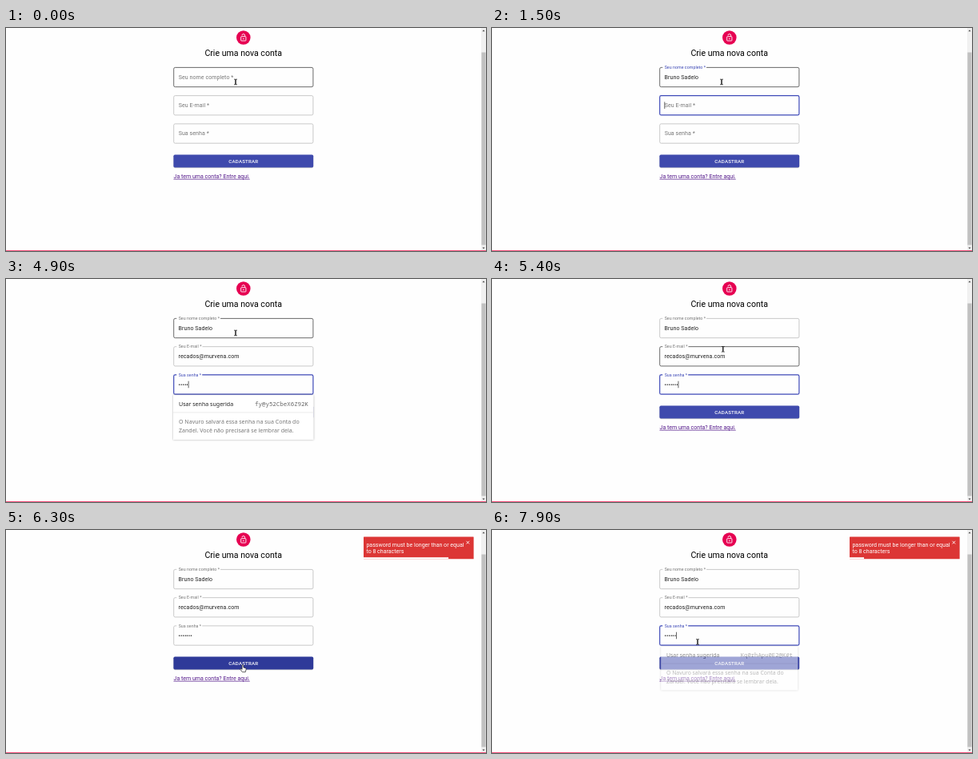
Animation, 600 px wide and 279 px high, one loop 8000 ms. Source, as an HTML page:

```html
<!DOCTYPE html>
<html lang="pt-BR">
<head>
<meta charset="utf-8">
<title>Crie uma nova conta</title>
<style>
  html, body { margin: 0; width: 100%; height: 100%; overflow: hidden; background: #fefefe; }
  svg { display: block; width: 600px; height: 279px; }
  text { font: 7.05px Roboto, sans-serif; white-space: pre; }
  .spaced { letter-spacing: .00938em; }
  .title { font-size: 10.58px; }
  .cta { font-size: 6.17px; font-weight: 500; letter-spacing: .02857em; }
  .link { fill: #551a8b; text-decoration: underline; }
  .popup { filter: drop-shadow(0 .5px 1.2px #0005); transform-box: fill-box; transform-origin: center; }
  .popup text { font-family: "Noto Sans", sans-serif; fill: #222; }
  .popup .hint { fill: #777; }
  .popup .mono { font: 7.45px "Noto Sans Mono", monospace; fill: #666; text-anchor: end; }
</style>
</head>
<body>
<svg id="stage" viewBox="0 0 600 279">
  <rect width="600" height="279" fill="#fefefe"/>
  <circle cx="296.8" cy="12" r="8.8" fill="#e60052"/>
  <g fill="none" stroke="#fff" stroke-width=".9">
    <rect x="293.7" y="10.7" width="6.2" height="5.3" rx=".5"/>
    <path d="M295 9.3a1.8 1.8 0 0 1 3.6 0v1.4"/>
    <circle cx="296.8" cy="13.4" r=".45"/>
  </g>
  <text class="title" x="296.7" y="34.8" text-anchor="middle">Crie uma nova conta</text>
  <g id="fields"></g>

  <clipPath id="buttonClip"><rect x="209.4" y="158.5" width="174.8" height="16" rx="1.8"/></clipPath>
  <rect x="209.4" y="159.2" width="174.8" height="16" rx="1.8" fill="#0003"/>
  <g clip-path="url(#buttonClip)">
    <rect id="button" x="209" y="158" width="176" height="17"/>
    <circle id="ripple" cx="296" cy="168" fill="#fff"/>
  </g>
  <text class="cta" x="296.8" y="168.7" text-anchor="middle" fill="#fff">CADASTRAR</text>
  <text class="link" x="209.5" y="187.8">Ja tem uma conta? Entre aqui.</text>

  <g id="toast" fill="#fff">
    <rect x="447" y="8.5" width="137.6" height="27.7" rx=".5" fill="#dc3635"/>
    <text x="450.4" y="20.8">password must be longer than or equal</text>
    <text x="450.4" y="29">to 8 characters</text>
    <path d="M575.5 13.8l3.6 3.6m0-3.6l-3.6 3.6" stroke="#fff" stroke-width=".9"/>
    <rect id="progress" x="447" y="34.2" height="2"/>
  </g>

  <g id="namePopup" class="popup">
    <rect x="209" y="74.2" width="175.5" height="23.2" fill="#fff"/>
    <text x="214.5" y="88.3">Bruno Sadelo</text>
  </g>
  <g id="emailPopup" class="popup">
    <rect x="209" y="109.4" width="175.5" height="23.2" fill="#fff"/>
    <text x="214.5" y="123.5">recados@murvena.com</text>
  </g>
  <g id="passwordPopup" class="popup">
    <rect x="209" y="145.2" width="175.5" height="56" fill="#fff"/>
    <path d="M209 167h175.5" stroke="#e2e2e2" stroke-width=".7"/>
    <text x="216" y="158.6">Usar senha sugerida</text>
    <text id="suggestion" class="mono" x="378" y="158.6"></text>
    <text class="hint" x="216" y="181">O Navuro salvará essa senha na sua Conta do</text>
    <text class="hint" x="216" y="192.2">Zandel. Você não precisará se lembrar dela.</text>
  </g>

  <rect x="594" width="6" height="278" fill="#f1f1f1"/>
  <rect x="594.4" y="30.5" width="5.2" height="241" fill="#c1c1c1"/>
  <path d="M595.4 4.2l1.6-2 1.6 2zM595.4 274.4l1.6 2 1.6-2z" fill="#505050"/>
  <rect y="278" width="600" height="1" fill="#f5557f"/>

  <g id="cursor">
    <path id="beam" d="M-1.8-3.3h1q.8 0 .8.8v5q0 .8-.8.8h-1M1.8-3.3h-1q-.8 0-.8.8v5q0 .8.8.8h1" fill="none" stroke="#111" stroke-width=".9"/>
    <path id="arrow" d="M0 0v8l1.9-1.7 1.2 2.9 1.2-.5-1.2-2.8h2.6z" fill="#111" stroke="#fff" stroke-width=".5"/>
    <path id="hand" d="M-.9 0q.9-1.2 1.8 0v3l2.4.7q1 .4.8 1.6l-.8 3.4h-3.9l-2.6-3.4q0-1.3 1.2-.7l1.1.8z" fill="#fff" stroke="#222" stroke-width=".7"/>
  </g>
</svg>
<script>
const LOOP = 8000, STEP = 100, BLUE = "#3f4ab8";
const $ = id => document.getElementById(id);
const clamp = v => Math.min(1, Math.max(0, v));
const within = (t, spans) => spans.find(([from, to]) => t >= from && t < to);

// Linear track through rows of [time, value, value...].
function track(t, rows, column = 1) {
  const next = rows.findIndex(row => row[0] > t);
  if (next === 0) return rows[0][column];
  if (next < 0) return rows.at(-1)[column];
  const a = rows[next - 1], b = rows[next];
  return a[column] + (b[column] - a[column]) * (t - a[0]) / (b[0] - a[0]);
}

function add(parent, tag, attrs, content = "") {
  const node = document.createElementNS("http://www.w3.org/2000/svg", tag);
  set(node, attrs);
  node.textContent = content;
  return parent.appendChild(node);
}
function set(node, attrs) {
  for (const key in attrs) node.setAttribute(key, attrs[key]);
}

const fields = [
  { label: "Seu nome completo *", value: "Bruno Sadelo", top: 49.2, focus: [[100, 1500]],
    keys: [[250, 0], [800, 5], [1000, 5], [1400, 12]] },
  { label: "Seu E-mail *", value: "recados@murvena.com", top: 84.45, focus: [[1500, 4200]],
    keys: [[1850, 0], [2600, 7], [2800, 7], [3300, 15], [3450, 15], [3800, 17], [3950, 17], [4150, 19]] },
  { label: "Sua senha *", value: "•••••••", top: 119.7, focus: [[4200, 5700], [6900, LOOP]],
    keys: [[4400, 0], [4900, 5], [5100, 7], [7200, 7], [7250, 0], [7300, 0], [7900, 6]] },
];
for (const f of fields) {
  const g = $("fields");
  f.box = add(g, "rect", { x: 209.7, y: f.top + .2, width: 174.2, height: 24.3, rx: 1.8, fill: "none" });
  f.notch = add(g, "rect", { x: 213.2, y: f.top - 1, height: 2.4, fill: "#fefefe" });
  f.labelNode = add(g, "text", { class: "spaced" }, f.label);
  f.text = add(g, "text", { class: "spaced", x: 215.6, y: f.top + 15, fill: "#222" });
  f.caret = add(g, "rect", { y: f.top + 8, width: .7, height: 8.6, fill: "#222" });
}

const typed = (f, t) => Math.floor(track(t, f.keys) + 1e-6);

function drawField(f, t, hovered) {
  const focus = within(t, f.focus), count = typed(f, t);
  const rise = clamp((t - f.focus[0][0]) / 150);
  set(f.box, {
    stroke: focus ? BLUE : hovered ? "#444" : "#bcbcbc",
    "stroke-width": focus ? 1.2 : .8,
  });
  set(f.labelNode, {
    transform: `translate(215.67 ${f.top + 14.75 - 12.95 * rise}) scale(${1 - .25 * rise})`,
    fill: focus && within(t - STEP, f.focus) || within(t - STEP, f.focus) ? BLUE : "#777",
  });
  set(f.notch, { width: rise * (f.labelNode.getComputedTextLength() * .75 + 3.5) });
  f.text.textContent = f.value.slice(0, count);
  const blink = focus && (count !== typed(f, t - 200) || (t - focus[0]) % 530 < 265);
  set(f.caret, {
    x: 215.5 + (count ? f.text.getComputedTextLength() : 0),
    opacity: blink ? 1 : 0,
  });
}

function drawPopup(node, t, spans) {
  const fade = Math.max(...spans.map(([open, close]) =>
    clamp(Math.min((t - open) / 100, 1 - (t - close) / 100))));
  node.style.opacity = fade;
  node.style.transform = `scale(${.95 + .05 * fade})`;
}

const mouse = [[5350, 287, 67.5], [5600, 296, 169], [6350, 296, 169], [6800, 257, 140]];
const bounce = [[5850, 1320], [6060, -11], [6112, 4.4], [6165, -2.2], [6200, 0]];

function draw(t) {
  const x = track(t, mouse), y = track(t, mouse, 2);
  const onButton = y > 158 && y < 175;
  const hoveredField = fields.find(f => y > f.top && y < f.top + 24.6);

  for (const f of fields) drawField(f, t, f === hoveredField);

  set($("cursor"), { transform: `translate(${x} ${y})` });
  set($("hand"), { opacity: +onButton });
  set($("beam"), { opacity: +!!hoveredField });
  set($("arrow"), { opacity: +!(onButton || hoveredField) });

  set($("button"), { fill: onButton ? "#2f3a99" : "#3f4aad" });
  set($("ripple"), {
    r: Math.min(95, Math.max(0, t - 5700) * .675),
    opacity: .17 * clamp(1 - (t - 5900) / 250),
  });

  set($("toast"), { transform: `translate(${track(t, bounce)} 0)` });
  set($("progress"), { width: 137.6 * clamp((8227 - t) / 2500) });

  drawPopup($("namePopup"), t, [[300, 1350]]);
  drawPopup($("emailPopup"), t, [[1900, 4150]]);
  drawPopup($("passwordPopup"), t, [[4200, 4950], [7200, 7850]]);
  $("suggestion").textContent = t < 6000 ? "fy@y52CbeX6Z92K" : "Kq0rhApu0E2@K#t";
}

const start = performance.now();
function tick() {
  const t = (performance.now() - start) % LOOP;
  draw(Math.floor(t / STEP) * STEP);
  requestAnimationFrame(tick);
}
tick();
</script>
</body>
</html>
```
